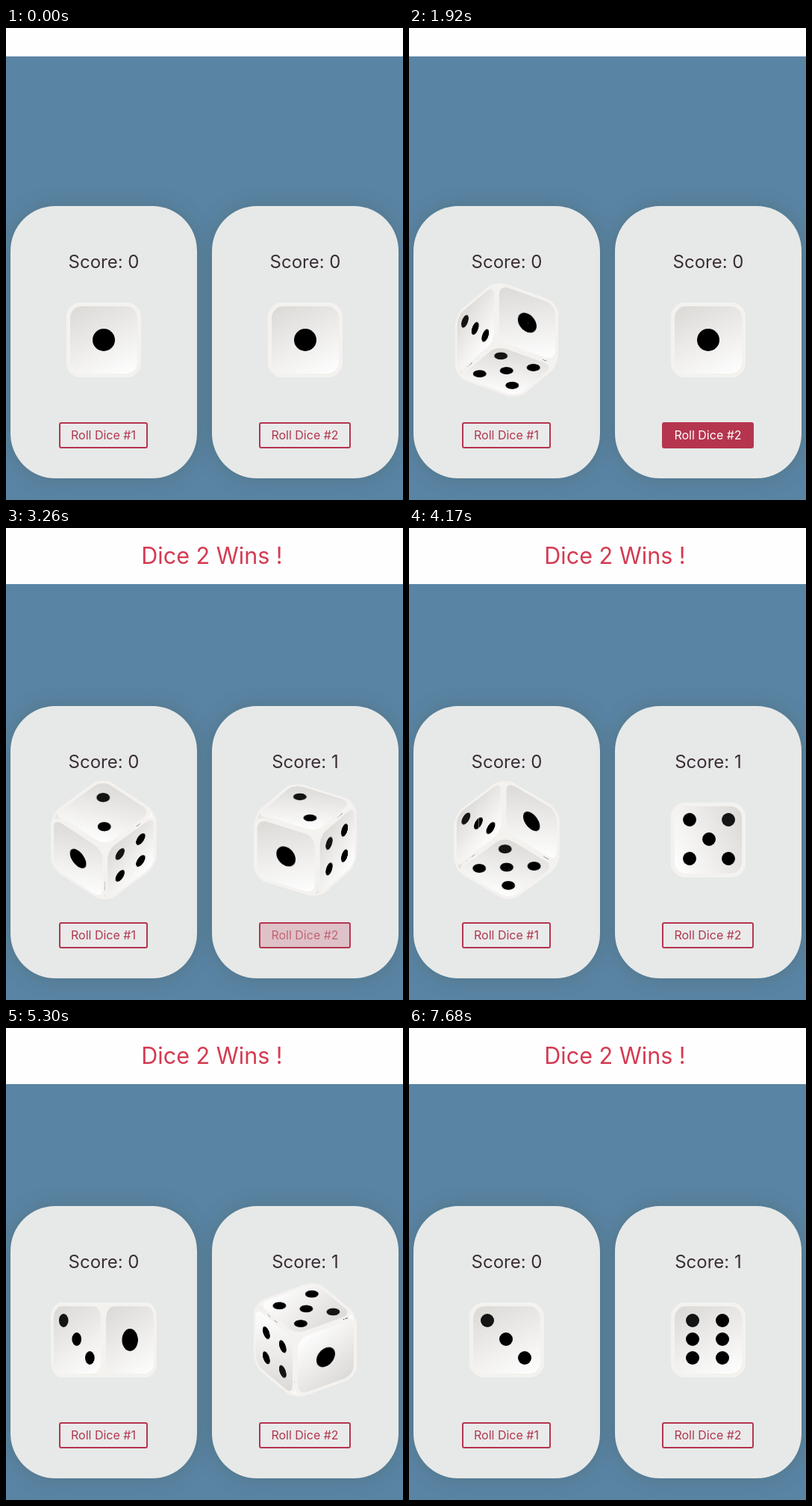
An HTML page that plays this animation: 532x631 px, repeating every 8.01 s.

```html
<!DOCTYPE html>
<html lang="en">
<head>
<meta charset="utf-8">
<title>Dice duel</title>
<style>
  html, body { margin: 0; width: 100%; height: 100%; overflow: hidden; background: #fefefe; }
  body { font-family: Montserrat, Inter, sans-serif; }
  #stage { position: relative; width: 532px; height: 631px; overflow: hidden; }
  #message {
    position: absolute; left: 10px; top: 17px; width: 532px; line-height: 40px;
    text-align: center; font-size: 30.5px; color: #d43a52;
  }
  #board { position: absolute; left: 0; right: 0; bottom: 0; background: #5a84a4; }
  .card {
    position: absolute; top: 238px; width: 250px; height: 364px; border-radius: 60px;
    background: #e7e9e8; box-shadow: 0 0 24px rgba(70, 95, 85, .38);
  }
  .score {
    position: absolute; top: 60px; width: 100%; line-height: 30px;
    text-align: center; font-size: 24px; color: #3a2d35;
  }
  .button {
    position: absolute; top: 289px; height: 35px; line-height: 31px; box-sizing: border-box;
    border: 2px solid #b5354f; border-radius: 3px; text-align: center; font-size: 16px;
  }
  .die { position: absolute; left: 75px; top: 129px; width: 100px; height: 100px; transform-style: preserve-3d; }
  .face, .core {
    position: absolute; box-sizing: border-box; width: 100px; height: 100px;
    border: 5px solid #f4f2ef; border-radius: 20px;
  }
  .face { background: linear-gradient(155deg, #dbd9d6, #fff) padding-box, #f4f2ef; }
  .core { background: #f4f2ef; }
  .pip { position: absolute; border-radius: 50%; background: #000; }
</style>
</head>
<body>
<div id="stage">
  <div id="board"></div>
  <div id="message">Dice 2 Wins !</div>
</div>
<script>
const LOOP = 8010, RATE = 0.951, SPIN = 455;
const stage = document.getElementById('stage');
const board = document.getElementById('board');
const message = document.getElementById('message');

const turns = ['', 'rotateX(90deg)', 'rotateY(-90deg)', 'rotateY(90deg)', 'rotateX(-90deg)', 'rotateX(180deg)'];
const square = d => [[-d, -d], [d, -d], [-d, d], [d, d]];
const pips = [
  [[0, 0]],
  [[-20, -20], [20, 20]],
  [[-25, -25], [0, 0], [25, 25]],
  square(20),
  [...square(26), [0, 0]],
  [-25, 0, 25].flatMap(y => [[-20, y], [20, y]])
];

function add(parent, className, text = '') {
  const el = document.createElement('div');
  el.className = className;
  el.textContent = text;
  parent.append(el);
  return el;
}

function makeDie(parent) {
  const die = add(parent, 'die');
  ['', 'rotateX(90deg)', 'rotateY(90deg)'].forEach(turn => {
    add(die, 'core').style.transform = turn;
  });
  turns.forEach((turn, n) => {
    const face = add(die, 'face');
    face.style.transform = turn + ' translateZ(50px)';
    const size = n ? 18 : 30, shift = n ? 44 : 45;
    pips[n].forEach(([x, y], k) => {
      const s = add(face, 'pip').style;
      s.width = s.height = size + 'px';
      s.left = shift + x - size / 2 + 'px';
      s.top = shift + y - size / 2 + 'px';
      if (n && !k) s.background = '#141414';
    });
  });
  return die;
}

function makePlayer(n, left, buttonLeft, buttonWidth, setup) {
  const card = add(stage, 'card');
  card.style.left = left + 'px';
  const score = add(card, 'score', 'Score: 0');
  const die = makeDie(card);
  const button = add(card, 'button', 'Roll Dice #' + n);
  button.style.left = buttonLeft - left + 'px';
  button.style.width = buttonWidth + 'px';
  return { score, die, button, ...setup };
}

// hover: fade-in start and end, fade-out start and end
const players = [
  makePlayer(1, 6, 71, 119, { start: 728, end: [0, 90], hover: [400, 640, 900, 1140] }),
  makePlayer(2, 276, 339, 123, { start: 2356, end: [180, 0], hover: [1110, 1430, 3000, 3333] })
];

const clamp = v => Math.min(1, Math.max(0, v));

// cubic-bezier(.25, .1, .25, 1)
function ease(x) {
  x = clamp(x);
  let lo = 0, hi = 1;
  for (let k = 0; k < 24; k++) {
    const t = (lo + hi) / 2;
    if (0.75 * t * (1 - t) + t ** 3 < x) lo = t; else hi = t;
  }
  const t = (lo + hi) / 2, u = 1 - t;
  return 0.3 * t * u * u + 3 * t * t * u + t ** 3;
}

// Spin out and back for 4 s, then settle on the rolled face
function pose(time, end) {
  if (time < 4000) {
    const spin = SPIN * (ease(time / 2000) - ease((time - 2000) / 2000));
    return [spin, spin];
  }
  const p = ease((time - 4050) / 1000);
  return end.map(angle => angle * p);
}

function mix(from, to, p) {
  return `rgb(${from.map((c, k) => Math.round(c + (to[k] - c) * p))})`;
}

function draw(t) {
  const step = Math.min(104, Math.floor((t - 380) / 70));
  const now = step < 0 ? 0 : 386 + 70.1 * step;
  for (const { die, button, start, end, hover: [a, b, c, d] } of players) {
    const [x, y] = pose((now - start) * RATE, end);
    die.style.transform = `rotateX(${x}deg) rotateY(${y}deg)`;
    const p = clamp((now - a) / (b - a)) - clamp((now - c) / (d - c));
    button.style.background = mix([234, 234, 234], [181, 53, 79], p);
    button.style.color = mix([176, 56, 78], [255, 255, 255], p);
  }
  const won = now >= players[1].start;
  message.style.visibility = won ? 'visible' : 'hidden';
  board.style.top = won ? '75px' : '38px';
  players[1].score.textContent = 'Score: ' + (won ? 1 : 0);
}

const origin = performance.now();
function tick() {
  draw((performance.now() - origin) % LOOP);
  requestAnimationFrame(tick);
}
tick();
</script>
</body>
</html>
```
